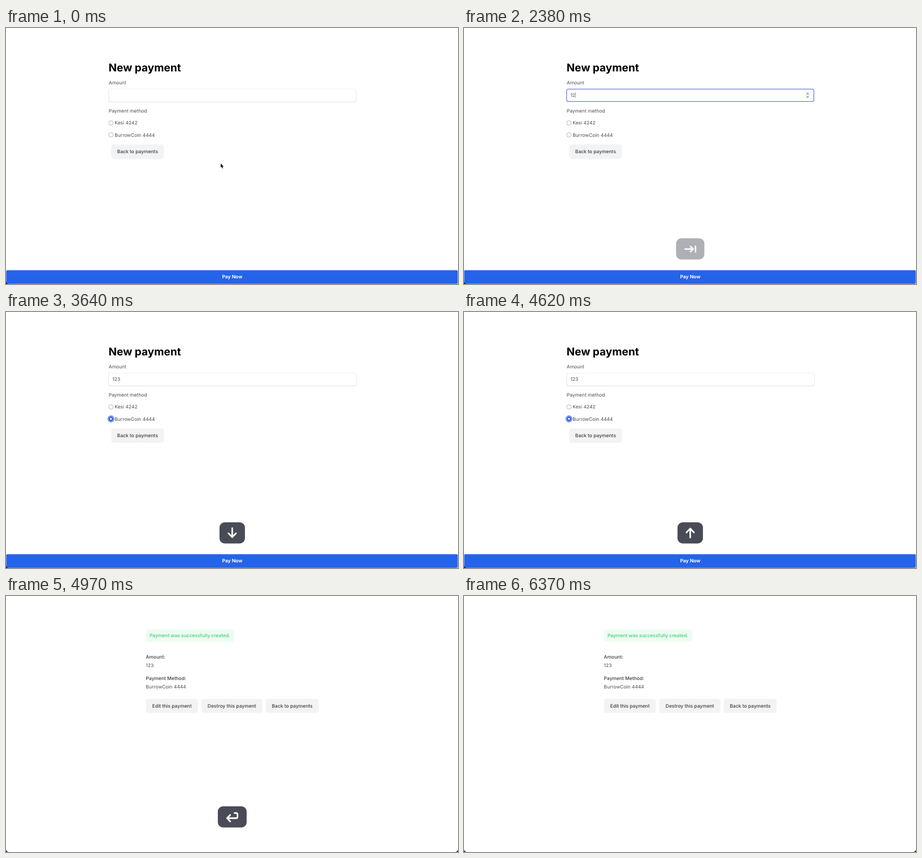
An HTML page with a canvas that plays this animation: 800x454 px, repeating every 6.65 s.

```html
<!DOCTYPE html>
<html lang="en">
<head>
<meta charset="utf-8">
<title>New payment</title>
<style>
  html, body { margin: 0; width: 100%; height: 100%; overflow: hidden; background: #fff; }
  canvas { display: block; }
</style>
</head>
<body>
<canvas id="stage" width="800" height="454"></canvas>
<script>
const ctx = document.getElementById('stage').getContext('2d');
const LOOP = 6650, STEP = 70;
const UNIT = 800 / 1512;           // page pixels to stage pixels
const BODY = 16 * UNIT, TITLE = 36 * UNIT;
const BLUE = '#2563eb', RING = '#6c80de', INK = '#4c4c4c', STRONG = '#3c3c3c', KEY = [73, 75, 86];
const CARDS = ['Kesi 4242', 'BurrowCoin 4444'];

const FOCUS_INPUT = 1260, FOCUS_RADIO = 3010, SUBMIT = 4900, RECEIPT = 4970;
const TYPED = [2030, 2240, 2450];
const SELECTED = [[3640, 1], [4200, 0], [4550, 1]];
const FADE_DELAY = 980, FADE_TIME = 250;
const PRESSES = [
  { at: FOCUS_INPUT, icon: 'tab', width: 50, grows: true },
  { at: FOCUS_RADIO, icon: 'tab', width: 50, grows: true },
  { at: 3640, icon: 'down', width: 45 },
  { at: 4200, icon: 'up', width: 45 },
  { at: 4550, icon: 'up', width: 45 },
  { at: SUBMIT, icon: 'enter', width: 51 }
];
const ICONS = {
  tab: new Path2D('M-9.3 .3H5M.4-4.4L5.4 .3L.4 5M9.3-4.9V5.5'),
  up: new Path2D('M0 8.3V-7.4M-6.6-.8L0-7.6L6.6-.8'),
  down: new Path2D('M0-8.3V7.4M-6.6 .8L0 7.6L6.6 .8'),
  enter: new Path2D('M4-6.8H7Q9.3-6.8 9.3-4.5V0Q9.3 2.3 7 2.3H-8.8M-3.6-3.4L-9.2 2.3L-3.6 8')
};
const POINTER = new Path2D('M380 240.2V247.6L381.7 246.1L382.9 248.9L384.1 248.4L383 245.7H385.3Z');

function text(str, x, middle, { size = BODY, weight = 400, color = INK, align = 'left' } = {}) {
  ctx.font = `${weight} ${size}px Inter, sans-serif`;
  ctx.textAlign = align;
  ctx.fillStyle = color;
  ctx.fillText(str, x, middle + size * 0.364);
}

function box(x, y, w, h, r, fill, stroke, line = UNIT) {
  ctx.beginPath();
  ctx.roundRect(x, y, w, h, r);
  if (fill) { ctx.fillStyle = fill; ctx.fill(); }
  if (stroke) { ctx.strokeStyle = stroke; ctx.lineWidth = line; ctx.stroke(); }
}

function disc(x, y, r, fill, stroke, line) {
  box(x - r, y - r, 2 * r, 2 * r, r, fill, stroke, line);
}

function button(label, x, middle, width) {
  box(x, middle - 12.7, width, 25.4, 4.2, '#f2f3f4');
  text(label, x + width / 2, middle, { weight: 500, color: STRONG, align: 'center' });
}

function spinner() {
  box(604.4, 113, 7.6, 12.6, 2, '#ececec');
  ctx.fillStyle = '#777';
  ctx.fill(new Path2D('M606.4 117.3L608.2 115L610 117.3ZM606.4 121.4L608.2 123.7L610 121.4Z'));
}

function amountInput(t, value) {
  const focused = t >= FOCUS_INPUT && t < FOCUS_RADIO;
  if (focused) {
    box(181.6, 108.4, 437.6, 21.9, 3, '#fff', RING, 1.3);
    spinner();
  } else {
    ctx.save();
    ctx.shadowColor = 'rgba(0,0,0,.28)';
    ctx.shadowBlur = 1.6;
    ctx.shadowOffsetY = 0.6;
    box(182, 108.4, 437.8, 22, 3.2, '#fff');
    ctx.restore();
    box(182, 108.4, 437.8, 22, 3.2, '#fff', '#e5e7eb');
  }
  text(value, 188.4, 119.3);
  if (!focused) return;
  const lastEdit = Math.max(FOCUS_INPUT, ...TYPED.filter(at => at <= t));
  if ((t - lastEdit) % 1060 < 530) {
    const x = 188.7 + ctx.measureText(value).width;
    ctx.fillStyle = '#555';
    ctx.fillRect(x, 114, UNIT, 10);
  }
}

function radio(label, y, focused, checked) {
  const x = 185.8;
  if (focused) disc(x, y, 5.4, '#fff', '#4568dc', 1.1);
  if (checked) {
    disc(x, y, 4.2, BLUE);
    disc(x, y, 1.7, '#fff');
  } else {
    disc(x, y, 3.95, '#fff', '#6b7280');
  }
  text(label, 192.3, y);
}

function pointer() {
  ctx.lineWidth = 1;
  ctx.strokeStyle = '#fff';
  ctx.stroke(POINTER);
  ctx.fillStyle = '#000';
  ctx.fill(POINTER);
}

function formPage(t) {
  const value = '123'.slice(0, TYPED.filter(at => at <= t).length);
  const choice = SELECTED.filter(([at]) => at <= t).pop()?.[1] ?? -1;
  const radioFocus = t < FOCUS_RADIO ? -1 : Math.max(choice, 0);

  text('New payment', 181.6, 69.9, { size: TITLE, weight: 700, color: '#000' });
  text('Amount', 181.8, 97.4);
  amountInput(t, value);
  text('Payment method', 181.8, 147.2);
  CARDS.forEach((card, i) => radio(card, 168.4 + 21.1 * i, i === radioFocus, i === choice));
  button('Back to payments', 186.2, 219.2, 93.4);
  box(0.4, 429.6, 799.2, 24.2, 2, BLUE);
  text('Pay Now', 400.4, 441.4, { weight: 700, color: '#fff', align: 'center' });
  if (t < TYPED[0]) pointer();
}

function receiptPage() {
  box(248, 59, 156, 22, 4.2, '#ecfcf2');
  text('Payment was successfully created.', 253.9, 70, { weight: 500, color: '#45cb76' });
  text('Amount:', 247.6, 108.1, { weight: 500, color: STRONG });
  text('123', 247.6, 123.1);
  text('Payment Method:', 247.6, 146.2, { weight: 500, color: STRONG });
  text(CARDS[1], 247.6, 161.1);
  button('Edit this payment', 247.8, 194.9, 91.8);
  button('Destroy this payment', 345.7, 194.9, 108);
  button('Back to payments', 459.9, 194.9, 93.4);
}

function keyCap(t) {
  const press = PRESSES.filter(p => p.at <= t).pop();
  if (!press) return;
  const age = t - press.at;
  const alpha = Math.min(1, 1 - (age - FADE_DELAY) / FADE_TIME);
  if (alpha <= 0) return;
  const scale = press.grows && age < STEP ? 0.85 : 1;
  // The cap always lies on white, so fading is a blend towards white.
  const fill = `rgb(${KEY.map(c => Math.round(255 + (c - 255) * alpha))})`;
  ctx.save();
  ctx.translate(400.4, 391.7);
  ctx.scale(scale, scale);
  box(-press.width / 2, -18.7, press.width, 37.4, 9, fill);
  ctx.strokeStyle = '#fff';
  ctx.lineWidth = press.icon === 'tab' ? 2.5 : 2.8;
  ctx.lineCap = ctx.lineJoin = 'round';
  ctx.stroke(ICONS[press.icon]);
  ctx.restore();
}

function windowCorners(both) {
  ctx.fillStyle = '#1c1c1c';
  ctx.fill(new Path2D('M0 449Q.3 453.7 5 454H0Z'));
  if (both) ctx.fill(new Path2D('M800 449Q799.7 453.7 795 454H800Z'));
}

function draw(t) {
  const done = t >= RECEIPT;
  ctx.fillStyle = '#fff';
  ctx.fillRect(0, 0, 800, 454);
  if (done) receiptPage(); else formPage(t);
  keyCap(t);
  windowCorners(done);
}

let start;
function tick(now) {
  start ??= now;
  const t = (now - start) % LOOP;
  draw(Math.floor(t / STEP) * STEP);
  requestAnimationFrame(tick);
}
ctx.textRendering = 'geometricPrecision';
draw(0);
requestAnimationFrame(tick);
</script>
</body>
</html>
```
